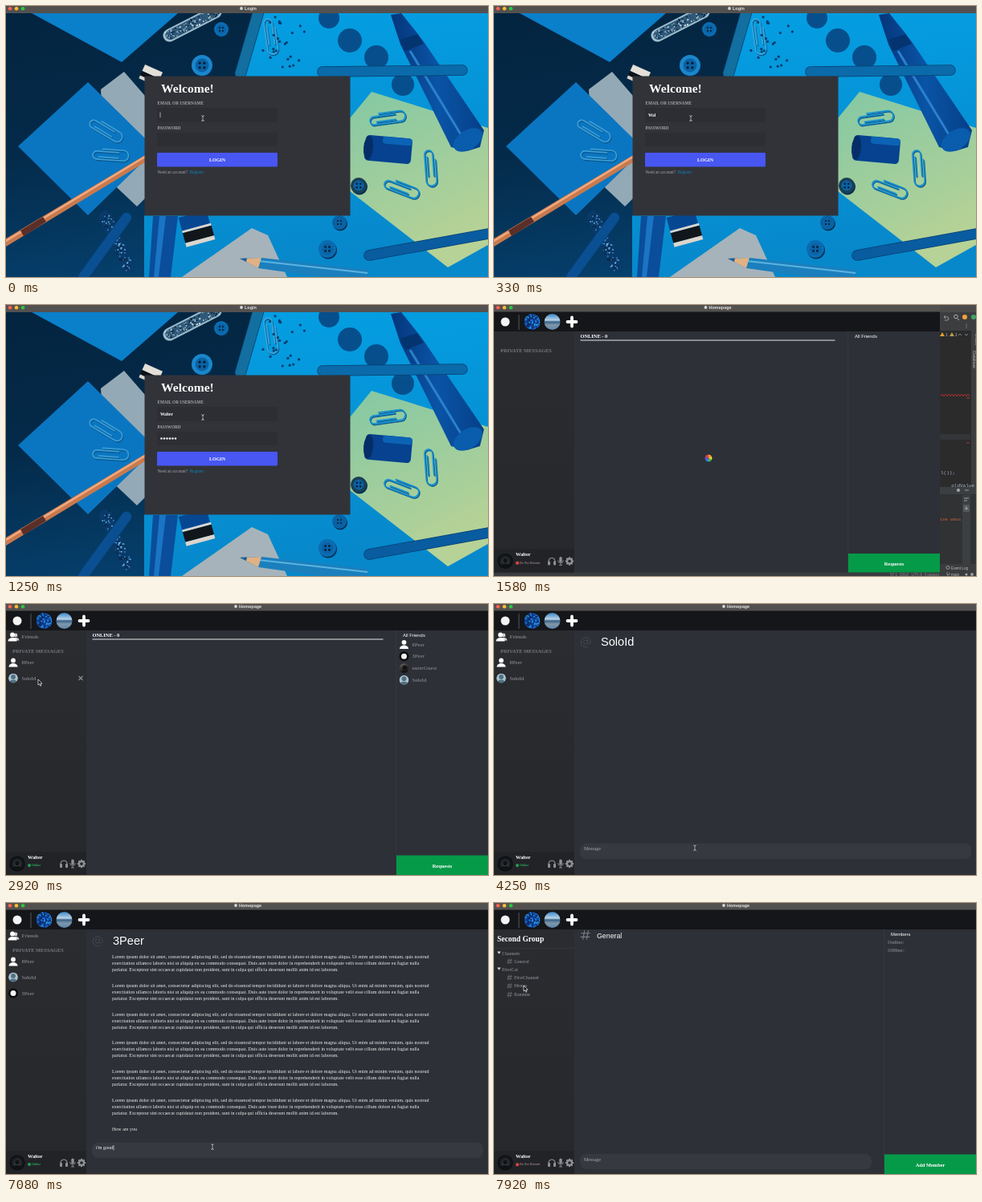
These frames come from a looping animation (600 by 338 pixels, 8000 ms). An HTML page:

```html
<!DOCTYPE html>
<html lang="en">
<head>
<meta charset="utf-8">
<title>Chat client</title>
<style>
html, body { margin: 0; width: 100%; height: 100%; overflow: hidden; background: #2e3138; }
svg { display: block; width: 100vw; height: 100vh; }
text { white-space: pre; }
.s { font-family: "Liberation Serif", serif; }
.a { font-family: "Liberation Sans", sans-serif; }
.m { font-family: "Liberation Mono", monospace; }
.b { font-weight: bold; }
</style>
</head>
<body>
<svg viewBox="0 0 600 338" preserveAspectRatio="none">
  <defs>
    <linearGradient id="desk" x2=".3" y2="1"><stop offset="0" stop-color="#03243f"/><stop offset=".5" stop-color="#042a49"/><stop offset="1" stop-color="#05406d"/></linearGradient>
    <linearGradient id="sheet" x2=".2" y2="1"><stop offset="0" stop-color="#04a0e4"/><stop offset="1" stop-color="#0788cb"/></linearGradient>
    <linearGradient id="note" x2=".4" y2="1"><stop offset="0" stop-color="#84c8a4"/><stop offset="1" stop-color="#b6d296"/></linearGradient>
    <linearGradient id="pen"><stop offset="0" stop-color="#05357a"/><stop offset=".5" stop-color="#0a54a6"/><stop offset="1" stop-color="#053f88"/></linearGradient>
    <linearGradient id="side" x2="0" y2="1"><stop offset="0" stop-color="#2b2c30"/><stop offset="1" stop-color="#27282c"/></linearGradient>
    <linearGradient id="view" x2="0" y2="1"><stop offset="0" stop-color="#3a86c8"/><stop offset=".4" stop-color="#b9d3e6"/><stop offset=".5" stop-color="#38618a"/><stop offset=".7" stop-color="#7f98a8"/><stop offset="1" stop-color="#5d86ae"/></linearGradient>
    <linearGradient id="dusk" x2=".4" y2="1"><stop offset="0" stop-color="#76706c"/><stop offset=".5" stop-color="#3a3634"/><stop offset="1" stop-color="#161517"/></linearGradient>
    <radialGradient id="me"><stop offset="0" stop-color="#7b8790"/><stop offset=".45" stop-color="#23282d"/><stop offset="1" stop-color="#08090b"/></radialGradient>
    <clipPath id="disc"><circle r="10"/></clipPath>
    <clipPath id="face"><circle r="6"/></clipPath>
    <clipPath id="log"><rect x="100" y="62" width="500" height="232"/></clipPath>
  </defs>
  <g id="photo"></g>
  <g id="app"></g>
</svg>
<script>
const LOOP = 8000;
const HOME = 1300, LOADED = 1830, ZOOM = 2080, DM = 3100, FRIENDS = 5150, CHAT = 6000, SEND = 7260, GROUP = 7590;
const ME = 'Walter', ANN = '8Peer', SOLO = 'SoloId', PAL = '3Peer', FAR = 'outerGuest';
const LOREM = [
  'Lorem ipsum dolor sit amet, consectetur adipiscing elit, sed do eiusmod tempor incididunt ut labore et dolore magna aliqua. Ut enim ad minim veniam, quis nostrud',
  'exercitation ullamco laboris nisi ut aliquip ex ea commodo consequat. Duis aute irure dolor in reprehenderit in voluptate velit esse cillum dolore eu fugiat nulla',
  'pariatur. Excepteur sint occaecat cupidatat non proident, sunt in culpa qui officia deserunt mollit anim id est laborum.'
];
// time, x, y
const PATH = [
  [0, 245, 140], [HOME, 245, 140], [HOME + 1, 267, 191], [LOADED, 267, 191], [2060, 180, 4], [2160, 180, 4],
  [2800, 41, 97], [3120, 41, 97], [3600, 250, 304], [4700, 250, 304], [5080, 32, 41], [5180, 32, 41],
  [5560, 532, 90], [5650, 532, 90], [5930, 513, 68], [6050, 513, 68],
  [6500, 257, 304], [7280, 257, 304], [7540, 72, 21], [7620, 72, 21], [7880, 38, 106], [LOOP, 38, 106]
];

const range = (n, f) => Array.from({ length: n }, (_, i) => f(i)).join('');
const clamp = v => Math.max(0, Math.min(1, v));
const ease = v => v * v * (3 - 2 * v);
function random(seed) {
  return () => (seed = (seed * 16807) % 2147483647) / 2147483647;
}

const text = (x, y, str, size, fill, cls = 's b', anchor = 'start') =>
  `<text x="${x}" y="${y}" class="${cls}" font-size="${size}" fill="${fill}" text-anchor="${anchor}">${str}</text>`;
const rect = (x, y, w, h, fill, r = 0) => `<rect x="${x}" y="${y}" width="${w}" height="${h}" rx="${r}" fill="${fill}"/>`;
const dot = (x, y, r, fill) => `<circle cx="${x}" cy="${y}" r="${r}" fill="${fill}"/>`;
const poly = (points, fill) => `<polygon points="${points}" fill="${fill}"/>`;
const line = (d, stroke, w = 1, cap = 'butt') =>
  `<path d="${d}" fill="none" stroke="${stroke}" stroke-width="${w}" stroke-linecap="${cap}" stroke-linejoin="round"/>`;
const at = (x, y, body, turn = 0) => `<g transform="translate(${x} ${y}) rotate(${turn})">${body}</g>`;

function specks(n, seed, w, h, colors, r) {
  const rnd = random(seed);
  return range(n, () => dot(((rnd() - .5) * w).toFixed(1), ((rnd() - .5) * h).toFixed(1), r, colors[Math.floor(rnd() * colors.length)]));
}

const button = (x, y, r, fill) => dot(x + 1, y + 1.5, r, '#032f52') + dot(x, y, r, fill) + dot(x, y, r * .65, '#0a62a4') +
  range(4, i => dot(x + r * .22 * (i % 2 ? 1 : -1), y + r * .22 * (i < 2 ? 1 : -1), r * .12, '#021c30'));
const wire = 'M12 -5H-15a5 5 0 0 0 0 10H18a6.500 6.500 0 0 0 0 -13H-8M12 2H-12';
const clip = (x, y, turn, color) => at(x + 1, y + 1.5, line(wire, '#0a5a92', 1.600, 'round'), turn) + at(x, y, line(wire, color, 1.700, 'round'), turn);
const stick = (d, color, w) => line(d, '#053f70', w + 1.5, 'round') + line(d, color, w, 'round');

function photo() {
  return rect(0, 0, 600, 338, 'url(#desk)') +
    poly('318,9 600,9 600,338 172,338 172,262 285,90', 'url(#sheet)') +
    poly('32,9 214,9 144,70', '#0a7fca') +
    at(232, 22, rect(-40, -8, 80, 16, '#9dbccb', 8) + rect(-37, -6, 74, 12, '#2f5878', 6) + specks(100, 11, 70, 11, ['#c9dce4', '#0a2238', '#7fa9c4'], .9), -27) +
    stick('M314 8L292 84', '#126f9f', 13) + clip(328, 36, 82, '#3aa6da') +
    button(244, 74, 13, '#1a86cb') + button(268, 29, 9, '#0c6cb2') +
    at(348, 44, specks(24, 5, 56, 72, ['#053e70'], 1.6)) +
    dot(402, 15, 13, '#064f8c') + dot(428, 43, 15, '#064f8c') + dot(461, 64, 15, '#064f8c') + dot(494, 98, 14, '#064f8c') +
    poly('118,104 147,82 173,112 173,240 163,250 125,214', '#94a9b6') +
    poly('102,95 173,165 173,192 102,261 15,175', '#0a76c2') +
    at(174, 93, rect(-9, -18, 24, 9, '#e4dfd8') + rect(-9, -9, 24, 6, '#0c1218') + rect(-9, -3, 24, 4, '#d8d6d0'), 24) +
    clip(122, 155, 31, '#3b9dd6') + clip(128, 187, 4, '#3b9dd6') +
    poly('0,290 173,186 173,195 0,300', '#c9794c') + line('M0 293L173 188', '#f0ab82', 2.400) +
    poly('18,280 46,263 50,269 22,287', '#5b2e28') +
    poly('455,107 600,152 600,298 550,326 428,231 428,140', 'url(#note)') +
    clip(473, 141, -8, '#1590cf') + clip(527, 200, 86, '#1590cf') + clip(490, 228, 21, '#1590cf') +
    poly('479,11 492,9 512,34 521,46 595,155 590,176 574,181 554,176 491,48', 'url(#pen)') + line('M503 56L566 160', '#2a80cc', 3) +
    poly('490,42 512,35 520,47 497,56', '#04346f') + at(575, 167, '<ellipse rx="20" ry="12" fill="#0a5cac"/>', -32) +
    stick('M394 82L568 80', '#0b6aa9', 12) +
    at(476, 179, rect(-29, -16, 58, 32, '#06428f', 5) + rect(-8, -16, 37, 9, '#0c63b5', 4) + '<ellipse cx="-25" rx="6" ry="15" fill="#052e68"/>', 5) +
    button(439, 224, 10, '#1b3f52') + button(415, 270, 9, '#0a62a4') + button(400, 303, 11, '#0b6cb2') +
    stick('M452 311L606 283', '#095c9f', 12) +
    poly('219,338 306,277 326,286 350,338', '#a6b3ba') +
    poly('183,262 214,262 205,338 178,338', '#0a4d9a') + poly('191,262 199,262 190,338 184,338', '#1a75c4') +
    at(240, 281, rect(-20, -23, 36, 18, '#064792') + rect(-20, -6, 37, 3, '#d8d6d0') + rect(-20, -3, 37, 13, '#11161a') + rect(-20, 10, 37, 5, '#dcd5cd'), -15) +
    at(138, 294, rect(-42, -8, 84, 16, '#0a3a6a', 8) + specks(100, 23, 76, 13, ['#3d8fca', '#08203a', '#76b8e0'], .9), 66) +
    stick('M150 264L96 338', '#0a4f92', 12) +
    poly('291,315 318,314 450,329 450,338 392,338 314,327', '#1b7fbd') + line('M314 318L450 333', '#5ab4e0', 2) +
    poly('291,315 318,314 314,327', '#e0b184') + poly('291,315 300,314.500 299,319', '#185e9d');
}

function bar(w, title, start) {
  return rect(0, 0, w, 9, '#535150') + dot(5, 3.2, 2.3, '#ff5f57') + dot(13, 3.2, 2.3, '#febc2e') + dot(21, 3.2, 2.3, '#28c840') +
    dot(start - 4, 3, 1.900, '#d5d5d5') + text(start, 5.2, title, 5.5, '#e2e0df', 'a b');
}

function login(t) {
  const name = ME.slice(0, clamp((t - 80) / 500) * ME.length | 0);
  const stars = t < 740 ? 0 : Math.min(6, 1 + ((t - 740) / 80 | 0));
  return bar(600, 'Login', 297) + rect(172.5, 87.5, 256, 174, '#313339') +
    text(193, 108, 'Welcome!', 15.6, '#fff') +
    text(188.5, 123, 'EMAIL OR USERNAME', 5.2, '#a5a6aa') + rect(188, 127, 150, 18, '#2c2e33', 1) +
    text(188.5, 154, 'PASSWORD', 5.2, '#a5a6aa') + rect(188, 158, 150, 17, '#2c2e33', 1) +
    (t < 80 ? line('M192 132.500V139', '#ddd', .7) : '') + text(192, 138, name, 5.4, '#fff') +
    range(stars, i => dot(193.5 + i * 3.5, 166.5, 1.3, '#eee')) +
    rect(188, 183, 150, 17.5, '#4856f2', 1) + text(263, 193.7, 'LOGIN', 6, '#fff', 's b', 'middle') +
    text(188.5, 209, 'Need an account?', 5.3, '#a2a3a7', 's') + text(228.5, 209, 'Register', 5.3, '#0f86bd', 's');
}

function editor() {
  const code = (y, str, fill) => text(598, y, str, 6, fill, 'm', 'end');
  return rect(0, 0, 600, 338, '#2b2b2c') + rect(555, 0, 45, 9, '#4c4b4b') + rect(555, 9, 45, 23, '#3c3d3f') +
    line('M560 15h4a2 2 0 0 1 0 4h-3M562 13l-2 2l2 2', '#aaa', .8) + line('M577 17l2 2', '#bbb', 1) +
    '<circle cx="575" cy="14.500" r="2.300" fill="none" stroke="#bbb" stroke-width=".9"/>' +
    dot(586, 15, 3, '#f0a33a') + dot(597, 15, 3, '#3fa66a') +
    dot(588, 26, .6, '#aaa') + dot(588, 24, .6, '#aaa') + dot(588, 28, .6, '#aaa') +
    poly('555,39 558,34 561,39', '#e0a030') + text(562, 39, '1', 5, '#bbb', 'a') +
    poly('567,39 570,34 573,39', '#b99a4c') + text(574, 39, '1', 5, '#bbb', 'a') +
    line('M578 38l2 -2l2 2M586 36l2 2l2 -2', '#aaa', .7) + rect(594, 32, 6, 300, '#3b3d3f') +
    at(599, 43, text(0, 0, 'Gradle', 5, '#bbb', 'a', 'middle'), 90) + at(596, 68, text(0, 0, 'Database', 5, '#bbb', 'a', 'middle'), 90) +
    line('M556 114' + range(9, () => 'l2 -3l2 3'), '#a8322f', 1) + rect(555, 161, 38, 7, '#343538') +
    line('M588 116h4M588 172h4', '#a43b36', 1) +
    text(556, 211, 'l());', 6, '#a9b7c6', 'm') + code(227, 'oldValue', '#a9b7c6') +
    rect(555, 227, 45, 96, '#303234') + rect(555, 227, 45, 9, '#3c3f41') + dot(578, 231, 2, '#aaa') + line('M586 231h5', '#aaa', .9) +
    rect(583, 237, 10, 86, '#3c3f41') + rect(584, 249, 8, 9, '#55585a', 1) + line('M585 241h6M585 244h4M586 254h4M588 251v4', '#bbb', .8) +
    text(555, 269, 'ive wass', 5.5, '#d0603c', 'm') +
    rect(0, 323, 600, 15, '#3a3c3e') + '<circle cx="565" cy="327.500" r="2" fill="none" stroke="#bbb" stroke-width=".7"/>' +
    text(569, 330, 'Event Log', 4.700, '#bbb', 'a') + text(493, 337.5, '57:1  CRLF  UTF-8  4 spaces', 4.700, '#8a8a8a', 'a') +
    line('M564 337v-4M567 334v2l-3 1', '#aaa', .7) + text(569, 337.5, 'main', 4.700, '#bbb', 'a') + dot(588, 336, 1.5, '#aaa') + dot(595, 336, 2, '#999');
}

const person = fill => dot(0, -2.6, 2.900, fill) + `<path d="M-5.500 5.500C-5.500 -.5 5.500 -.5 5.500 5.500Z" fill="${fill}"/>`;
const avatars = {
  [ANN]: person('#fff'),
  [SOLO]: `<g clip-path="url(#face)">${dot(0, 0, 6, '#a9c3cf')}${at(0, 1, person('#52707f'))}</g>`,
  [PAL]: dot(0, 0, 6, '#0a0a0b') + dot(0, 0, 3.5, '#f2f2f2'),
  [FAR]: `<g clip-path="url(#face)">${dot(0, 0, 6, 'url(#dusk)')}${at(1, 2, person('#141315'))}</g>`
};
const pixels = `<g clip-path="url(#disc)">${dot(0, 0, 10, '#0c3f92')}${specks(130, 7, 20, 20, ['#1f77e0', '#0a1f4c', '#2f9be8', '#0d2f70'], .9)}</g>`;
const hash = (x, y, s, fill) => at(x, y, `<g transform="scale(${s})">${line('M-1 -5L-3 5M3 -5L1 5M-5 -2H5M-5.500 2H4.500', fill, 1)}</g>`);

function panel(h, busy) {
  const y = h - 14, ink = '#8e9094';
  return rect(0, h - 29, 100, 29, '#222327') + dot(14, y, 9.6, 'url(#me)') + at(14, y + 2, person('#101214')) +
    text(27, y - 6.2, ME, 6.3, '#fff') + (busy ? rect(27, y + .2, 4, 4, '#d8433a', 1.5) : dot(29, y + 2, 1.900, '#22a455')) +
    text(32, y + 3.4, busy ? 'Do Not Disturb' : 'Online', 3.900, busy ? '#8d7f80' : '#2aa35a') +
    at(72, y, line('M-4 2V0a4 4 0 0 1 8 0V2', ink, 1.2) + rect(-5, 0, 3, 5, ink, 1) + rect(2, 0, 3, 5, ink, 1)) +
    at(83, y, rect(-1.700, -5.5, 3.4, 7, ink, 1.700) + line('M-3.300 -1a3.300 3.300 0 0 0 6.600 0M0 2.500V5M-2 5h4', ink, .9)) +
    at(94, y, '<circle r="3" fill="none" stroke="#8e9094" stroke-width="2.400"/>' + range(8, i => `<g transform="rotate(${i * 45})">${rect(-1, -5.2, 2, 2, ink)}</g>`));
}

function history(sent) {
  const up = sent ? 20 : 0;
  return `<g clip-path="url(#log)">${range(6, i => LOREM.map((s, j) => text(132, 69 + i * 35.8 + j * 8 - up, s, 6, '#eee', 's')).join(''))}` +
    text(132, 284 - up, 'How are you', 6, '#eee', 's') + (sent ? text(132, 284, "i'm good", 6, '#eee', 's') : '') + '</g>';
}

function conversation(t, who) {
  const sent = t >= SEND;
  const typed = sent ? '' : "i'm good".slice(0, clamp((t - 6640) / 380) * 8 | 0);
  return `<circle cx="114" cy="47.500" r="2.600" fill="none" stroke="#44474e"/>` +
    line('M116.600 45v3.500a1.800 1.800 0 0 0 3.600 -1a6 6 0 1 0 -3 5.500', '#44474e', 1) +
    text(133, 52.2, who, 14.6, '#fff', 'a') + (who === PAL ? history(sent) : '') +
    rect(107, 298.5, 487, 19.5, '#373940', 8) +
    (typed ? text(112, 307.4, typed, 6, '#fff', 's') + line(`M${112 + typed.length * 2.75} 302v6.500`, '#fff', .6) : text(112, 307.4, 'Message', 6, '#a7a8ac', 's'));
}

function rightPanel(w, h, title, label, top, big) {
  const x = w - 114;
  return rect(x - .5, 33, .6, h - 33, '#3d4047') + rect(x, top, 114, h - top, '#059a48') +
    text(x + 57, (top + h) / 2 + 3, label, 6.4, '#fff', 's b', 'middle') +
    (big ? text(x + 7.5, 44, title, 9.7, '#fff') : text(x + 8, 41.2, title, 5.900, '#fff', 'a'));
}

function openChat(t) {
  if (t >= DM && t < FRIENDS) return SOLO;
  return t >= CHAT && t < GROUP ? PAL : '';
}

function home(t, cx, cy) {
  const k = ease(clamp((t - ZOOM) / 250)), w = 555 + 45 * k, h = 333.5 + 4.5 * k;
  const loaded = t >= LOADED, group = t >= GROUP, big = t >= FRIENDS, who = openChat(t);
  const grey = '#77797e';
  let s = (w < 600 ? editor() : '') + rect(0, 0, w, h, '#2d3037') + rect(0, 33, 100, h - 33, 'url(#side)') +
    bar(w, 'Homepage', w / 2 - 10) + rect(0, 8.5, w, 24.5, '#151619') +
    dot(14, 21, 5.5, '#f4f4f4') + line('M31 12V31', '#55575a') +
    at(47.5, 21, pixels) + at(72.5, 21, dot(0, 0, 10, 'url(#view)')) +
    line('M97 15.500V26.500M91.500 21H102.500', '#fff', 3.8, 'round') + panel(h, !loaded || group);

  if (group) {
    const cat = (y, str) => poly(`4,${y - 4} 8.500,${y - 4} 6.250,${y - .8}`, '#ddd') + text(10, y, str, 5.5, grey);
    const channel = (y, str) => hash(19.5, y - 1.8, .65, grey) + text(25, y, str, 5.4, grey);
    return s + text(4, 48, 'Second Group', 9.5, '#fff') + line('M0 56.500H100', '#3a3b40', .7) +
      cat(64.5, 'Channels') + channel(74.5, 'General') + cat(84.5, 'FirstCat') +
      channel(94.7, 'FirstChannel') + channel(105.2, 'Memes') + channel(116, 'Random') +
      hash(114, 40, 1.15, '#7b7d82') + text(128, 43.5, 'General', 8.8, '#fff', 'a') +
      rect(107, 313, 363, 19, '#373940', 8) + text(112, 321.5, 'Message', 6, '#a7a8ac', 's') +
      rightPanel(w, h, 'Members', 'Add Member', 313.5) + text(490, 50.5, 'Online:', 6.3, grey) + text(490, 61, 'Offline:', 6.3, grey);
  }

  const row = (y, name) => at(9, y, avatars[name]) + text(19.5, y + 2, name, 6.4, grey) +
    (cx < 100 && Math.abs(cy - y) < 9.5 ? line(`M90.500 ${y - 2.5}l5 5m0 -5l-5 5`, '#8c8e92', 1.2) : '');
  if (loaded) {
    s += at(12, 41, `<g transform="scale(.8)">${person('#cfcfcf')}</g>`) + at(8, 41, person('#fff')) + text(19.5, 43, 'Friends', 6.4, grey) +
      text(8, 60.6, 'PRIVATE MESSAGES', 6.4, grey) + row(73, ANN) + row(92.5, SOLO) + (who === PAL ? row(112.5, PAL) : '');
  } else {
    s += text(8, 58.6, 'PRIVATE MESSAGES', 6.4, grey);
  }
  if (who) return s + conversation(t, who);

  s += text(107.5, 41, 'ONLINE - 0', 6.4, '#fff') + line(`M107.500 44H${w - 130.5}`, '#e8e8e8', 1) +
    rightPanel(w, h, 'All Friends', 'Requests', big ? 315.5 : 310 + 3.5 * k, big);
  if (loaded) {
    [ANN, PAL, FAR, SOLO].forEach((name, i) => {
      const y = (big ? 53.7 : 50.4) + i * 14.8;
      s += at(w - 104.5, y, avatars[name]) + text(w - 94.5, y + 2.2, name, 6.4, grey);
    });
  }
  return s;
}

function pointer(t) {
  const i = Math.max(0, PATH.findIndex(p => p[0] > t) - 1), [t0, x0, y0] = PATH[i], [t1, x1, y1] = PATH[i + 1];
  const k = ease((t - t0) / (t1 - t0));
  return [x0 + (x1 - x0) * k, y0 + (y1 - y0) * k];
}

function cursor(t, x, y) {
  if (t >= HOME && t < LOADED) {
    const hues = ['#e8423b', '#f39a2d', '#f4d83c', '#47b54a', '#2a86e0', '#8b45c4'];
    return at(267, 191, hues.map((c, i) => `<path d="M0 0L4.500 0A4.500 4.500 0 0 1 2.250 3.900Z" fill="${c}" transform="rotate(${i * 60})"/>`).join(''), t * .36);
  }
  const field = t < HOME || (openChat(t) && x > 107 && y > 298);
  const beam = 'M-1.800 -3.300q1.800 0 1.800 1.300q0 -1.300 1.800 -1.300M0 -2V2.500M-1.800 3.500q1.800 0 1.800 -1.300q0 1.300 1.800 1.300';
  return at(x, y, field ? line(beam, '#111', 1.700) + line(beam, '#eee', .8)
    : '<path d="M-1 -3V4L.6 2.600L1.700 5.200L2.900 4.700L1.800 2.200H4Z" fill="#080808" stroke="#fff" stroke-width=".7"/>');
}

const back = document.getElementById('photo'), app = document.getElementById('app');
back.innerHTML = photo();
let shown = '';

function draw(t) {
  const [x, y] = pointer(t);
  const next = (t < HOME ? login(t) : home(t, x, y)) + cursor(t, x, y);
  if (next === shown) return;
  back.style.display = t < HOME ? '' : 'none';
  app.innerHTML = shown = next;
}

const start = performance.now();
function tick() {
  draw((performance.now() - start) % LOOP);
  requestAnimationFrame(tick);
}
tick();
</script>
</body>
</html>
```
